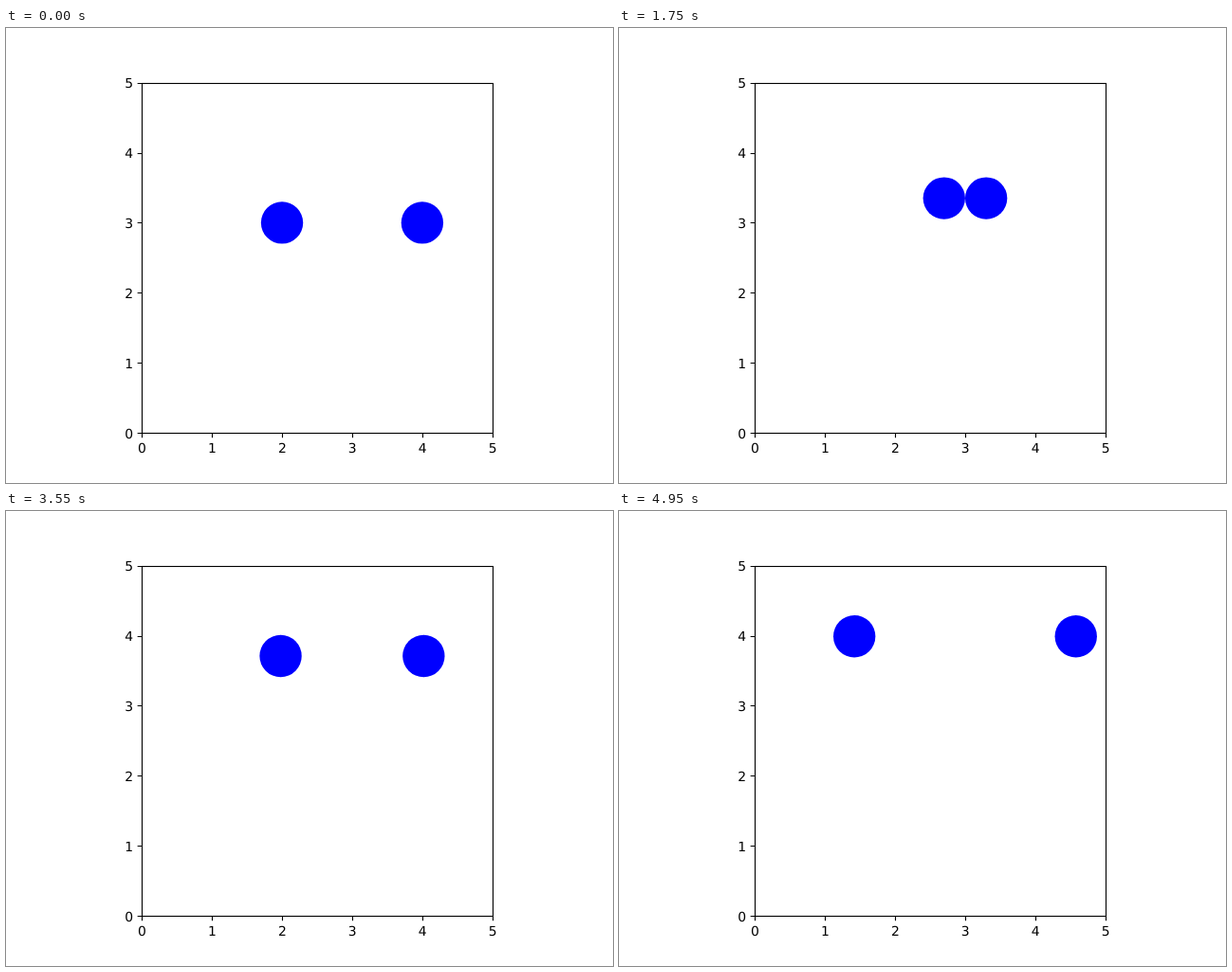
Recreate the animation shown at these times as an HTML page. Size 640x480 px, loop 5000 ms.

```html
<!DOCTYPE html>
<html lang="en">
<head>
<meta charset="utf-8">
<title>Two bouncing discs</title>
<style>
  html, body { margin: 0; width: 100%; height: 100%; overflow: hidden; background: #fff; }
  svg { display: block; width: 640px; height: 480px; }
  .axes { fill: none; stroke: #000; stroke-width: 1.11; }
  text { font: 13.89px "DejaVu Sans", sans-serif; text-rendering: geometricPrecision; }
  .x { text-anchor: middle; }
  .y { text-anchor: end; }

  circle { r: 22.176px; fill: #00f; }
  .left { animation: left 5s infinite, rise 5s steps(100) infinite; }
  .right { animation: right 5s infinite, rise 5s steps(100) infinite; }

  /* One step per 50 ms; the discs touch at 35% and turn back. */
  @keyframes left {
    0% { cx: 291.04px; animation-timing-function: steps(35); }
    35% { cx: 342.784px; animation-timing-function: steps(65); }
    100% { cx: 246.688px; }
  }
  @keyframes right {
    0% { cx: 438.88px; animation-timing-function: steps(35); }
    35% { cx: 387.136px; animation-timing-function: steps(65); }
    100% { cx: 483.232px; }
  }
  @keyframes rise {
    from { cy: 205.44px; }
    to { cy: 131.52px; }
  }
</style>
</head>
<body>
<svg viewBox="0 0 640 480">
  <circle class="left" cx="291.04" cy="205.44" r="22.176"/>
  <circle class="right" cx="438.88" cy="205.44" r="22.176"/>
  <g id="plot">
    <rect class="axes" x="143.5" y="58.5" width="370" height="369"/>
  </g>
</svg>
<script>
  const plot = document.getElementById('plot');
  const UNIT = 73.92, LEFT = 143.2, BOTTOM = 427.2, TICK = 4.86;
  const snap = v => Math.round(v) + 0.5;

  function add(name, attrs, text = '') {
    const el = document.createElementNS('http://www.w3.org/2000/svg', name);
    for (const key in attrs) el.setAttribute(key, attrs[key]);
    el.textContent = text;
    plot.append(el);
  }

  for (let n = 0; n <= 5; n++) {
    const x = LEFT + n * UNIT, y = BOTTOM - n * UNIT;
    add('path', { class: 'axes', d: `M${snap(x)} 427.5v${TICK}M143.5 ${snap(y)}h${-TICK}` });
    add('text', { class: 'x', x: x + 0.3, y: 448 }, n);
    add('text', { class: 'y', x: 134, y: Math.round(y + 5.35) }, n);
  }
</script>
</body>
</html>
```
